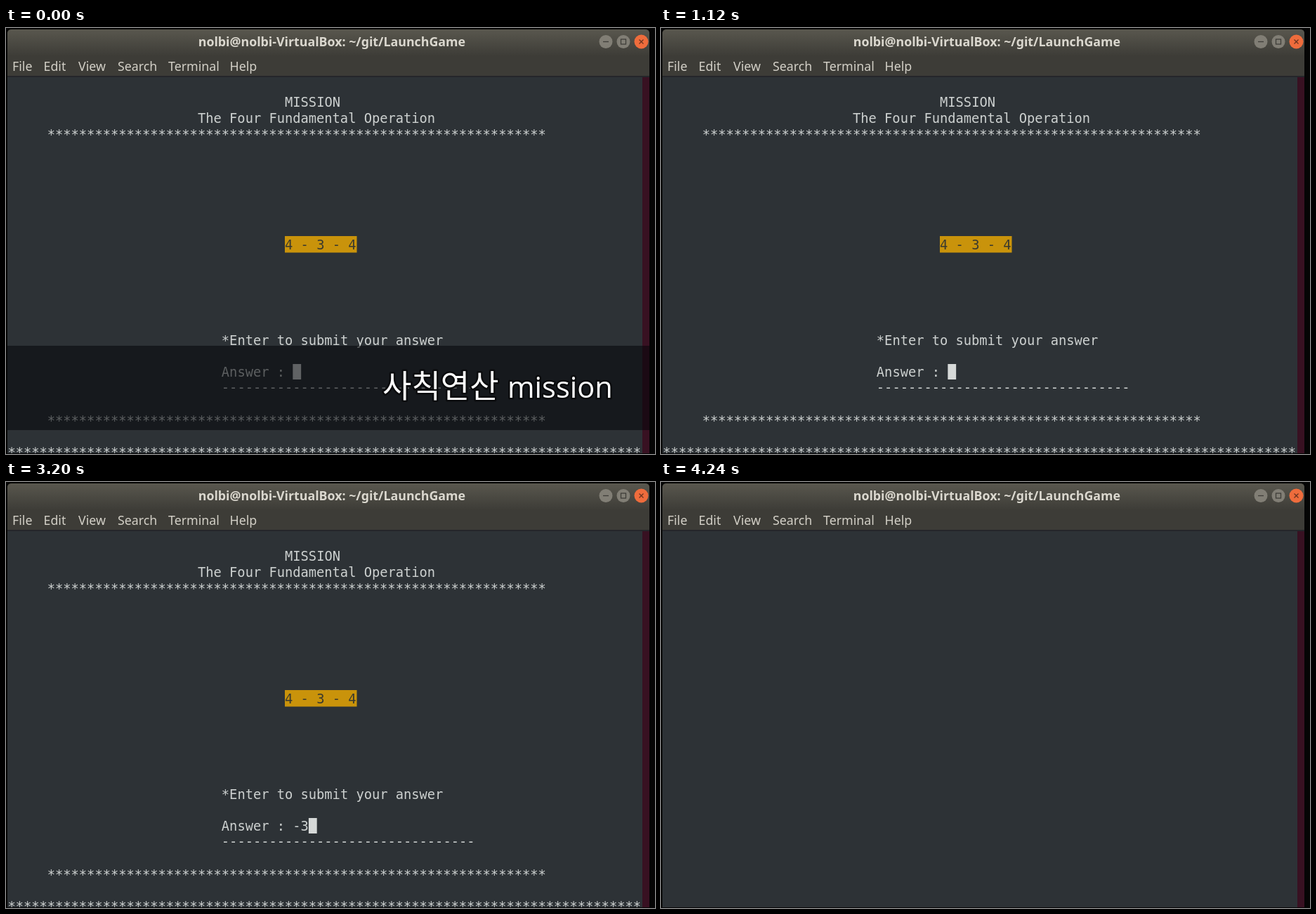
Recreate the animation shown at these times as an HTML page. Size 924x606 px, loop 4400 ms.

```html
<!DOCTYPE html>
<html lang="ko">
<head>
<meta charset="utf-8">
<title>Terminal mission</title>
<style>
html, body { margin: 0; width: 100%; height: 100%; overflow: hidden; background: #000; }
svg { display: block; width: 924px; height: 606px; }
text { white-space: pre; }
.bar { font-family: "Noto Sans", "Open Sans", sans-serif; font-size: 17.8px; fill: #d3d0c7; }
.title { font-weight: 700; fill: #dbd8cf; }
.term { font-family: "DejaVu Sans Mono", "Liberation Mono", monospace; font-size: 18.73px; fill: #cdd1d0; }
.caption { fill: #fff; stroke: #0b0c0e; stroke-width: 5px; stroke-linejoin: round; paint-order: stroke; }
.hangul { font-family: "Noto Sans CJK KR", "Noto Sans CJK JP", "Noto Sans CJK", sans-serif; font-size: 45px; }
.latin { font-family: "Open Sans", "Noto Sans", sans-serif; font-size: 41.5px; }
</style>
</head>
<body>
<svg viewBox="0 0 924 606">
  <defs>
    <linearGradient id="chrome" x1="0" y1="0" x2="0" y2="1">
      <stop offset="0" stop-color="#59574e"/>
      <stop offset="1" stop-color="#3d3c37"/>
    </linearGradient>
  </defs>
  <rect width="924" height="606" fill="#050505"/>
  <path d="M2 69V8Q2 2 8 2H910Q916 2 916 8V69Z" fill="#3d3c37"/>
  <path d="M2 40V8Q2 2 8 2H910Q916 2 916 8V40Z" fill="url(#chrome)"/>
  <rect x="2" y="68" width="914" height="2" fill="#25262a"/>
  <rect x="2" y="70" width="904" height="535" fill="#2d3236"/>
  <rect x="906" y="70" width="10" height="535" fill="#381122"/>
  <text class="bar title" x="654" y="26" text-anchor="end">nolbi@nolbi-VirtualBox: ~/git/LaunchGame</text>
  <g id="menu"></g>
  <g stroke="#3f3e39" stroke-width="1.3" fill="none">
    <circle cx="854" cy="19.5" r="9.5" fill="#817e75" stroke="none"/>
    <path d="M850 19.5h8"/>
    <circle cx="879" cy="19.5" r="9.5" fill="#817e75" stroke="none"/>
    <rect x="875.5" y="16" width="7" height="7"/>
    <circle cx="904.5" cy="19.5" r="10" fill="#ee6c3c" stroke="none"/>
    <path d="M901.5 16.5l6 6m0-6l-6 6" stroke="#6b3420"/>
  </g>
  <g id="mission"></g>
  <g id="win"></g>
  <g id="floor"></g>
  <g id="caption">
    <rect x="2" y="452" width="914" height="120" fill="#050609" fill-opacity=".56"/>
    <text class="caption hangul" x="536" y="526">사칙연산</text>
    <text class="caption latin" x="714" y="526">mission</text>
  </g>
</svg>
<script>
const LOOP = 4400;
const CAPTION_END = 1120, TYPE_START = 2800, TYPE_STEP = 80, WIN_START = 3760, CLEAR = 4240;
const ANSWER = "-3";
const COL = 11.276, ROW = 22.6;
const NS = "http://www.w3.org/2000/svg";
const $ = id => document.getElementById(id);
const colX = c => 2.4 + c * COL;
const rowY = r => 112 + r * ROW;

function add(parent, tag, attrs, content = "") {
  const node = document.createElementNS(NS, tag);
  for (const key in attrs) node.setAttribute(key, attrs[key]);
  node.textContent = content;
  parent.appendChild(node);
  return node;
}

function print(parent, col, row, content, dy = 0) {
  return add(parent, "text", { class: "term", x: colX(col), y: rowY(row) + dy }, content);
}

// asterisks sit slightly lower than the letters
const stars = (parent, col, row, content) => print(parent, col, row, content, 0.8);

const menuItems = { File: 9, Edit: 53.5, View: 103, Search: 159, Terminal: 231, Help: 318.5 };
for (const name in menuItems) add($("menu"), "text", { class: "bar", x: menuItems[name], y: 61 }, name);

const mission = $("mission");
print(mission, 35, 0, "MISSION");
print(mission, 24, 1, "The Four Fundamental Operation");
stars(mission, 5, 2, "*".repeat(63));
add(mission, "rect", { x: 397, y: 296, width: 102.5, height: 23.5, fill: "#c9930b" });
print(mission, 35, 9, "4 - 3 - 4").style.fill = "#3b3a2e";
print(mission, 27, 15, "*Enter to submit your answer");
const answer = print(mission, 27, 17, "");
const cursor = add(mission, "rect", { y: 478, width: 11.8, height: 22, fill: "#d6d9d8" });
print(mission, 27, 18, "-".repeat(32), -0.8);
stars(mission, 5, 20, "*".repeat(63));

// W and I as rows of stars; the N diagonal is computed
const W = ["*   **   *", " * *  * * ", "  *    *  "];
for (let i = 0; i < 10; i++) {
  const w = W[i < 6 ? 0 : i < 9 ? 1 : 2];
  const bar = i === 0 ? "*******" : i === 9 ? "*******" : "   *   ";
  const n = Array(10).fill(" ");
  n[0] = n[9] = "*";
  if (i) n[Math.max(1, i - 1)] = "*";
  stars($("win"), 25, 7 + i, w + bar + " " + n.join(""));
}
stars($("floor"), 0, 22, "*".repeat(80));

const show = (id, on) => $(id).setAttribute("visibility", on ? "visible" : "hidden");

function draw(t) {
  const count = t < TYPE_START ? 0 : Math.min(ANSWER.length, 1 + Math.floor((t - TYPE_START) / TYPE_STEP));
  answer.textContent = "Answer : " + ANSWER.slice(0, count);
  cursor.setAttribute("x", colX(36 + count));
  show("caption", t < CAPTION_END);
  show("mission", t < WIN_START);
  show("win", t >= WIN_START && t < CLEAR);
  show("floor", t < CLEAR);
}

const start = performance.now();
function tick() {
  draw((performance.now() - start) % LOOP);
  requestAnimationFrame(tick);
}
tick();
</script>
</body>
</html>
```
